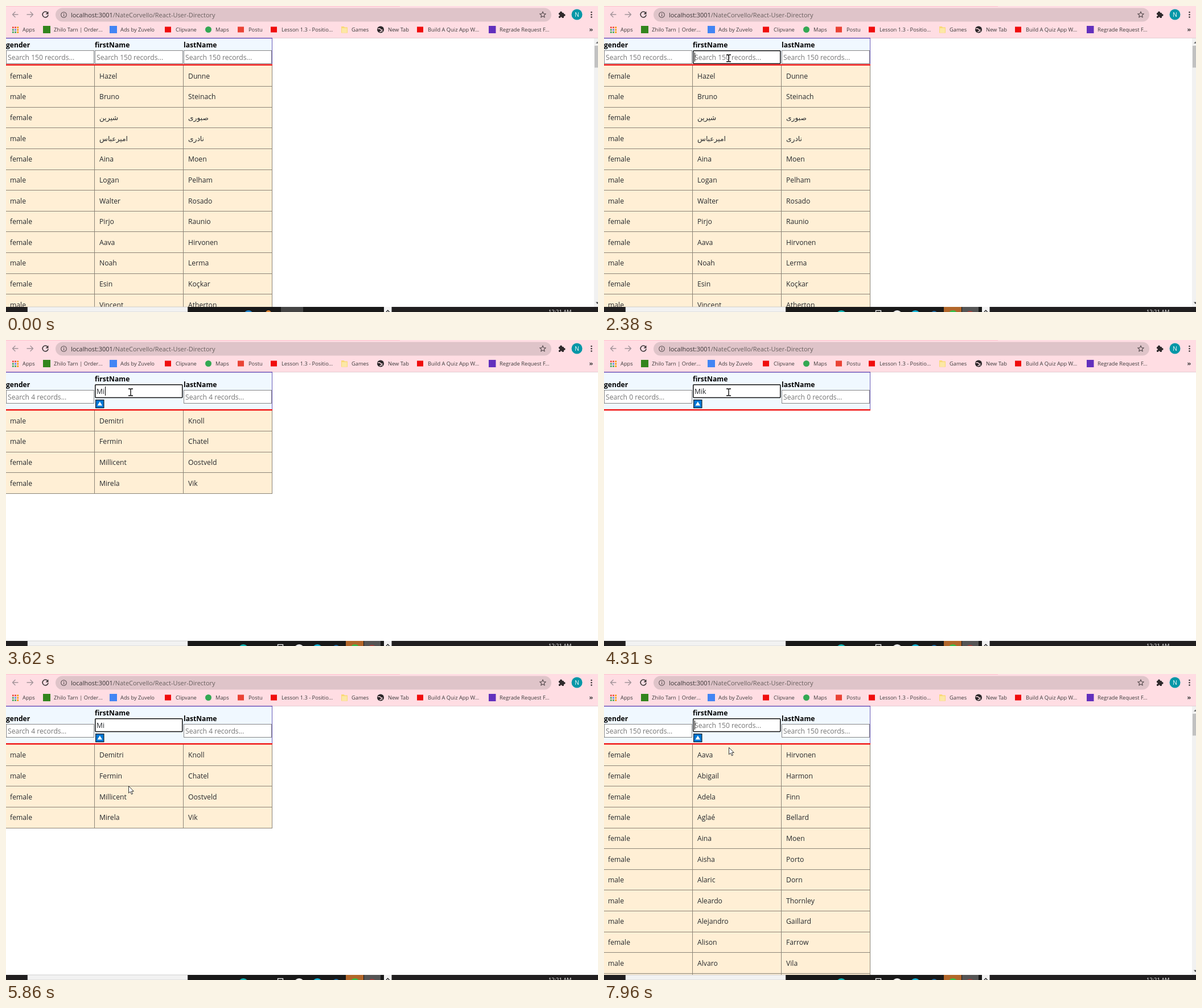
Recreate the animation shown at these times as an HTML page. Size 1040x539 px, loop 8000 ms.

```html
<!DOCTYPE html>
<html lang="en">
<head>
<meta charset="utf-8">
<title>User directory</title>
<style>
  html, body { margin: 0; width: 100%; height: 100%; overflow: hidden; background: #fff; }
  svg { display: block; position: absolute; left: 0; top: 0; }
  text { font: 12.2px "Open Sans", "Noto Sans", "DejaVu Sans", sans-serif; fill: #25282c; white-space: pre; }
  .label { font-weight: 700; font-size: 12.1px; fill: #000; }
  .hint { font-size: 12.1px; fill: #757575; }
  .mark { font-size: 9.3px; fill: #3c3a3b; }
  .url { font-size: 10.95px; fill: #69605f; }
  .line { fill: none; stroke-linecap: round; stroke-linejoin: round; }
</style>
</head>
<body>
<svg width="1040" height="539" viewBox="0 0 1040 539">
  <g id="page"></g>
  <g id="chrome"></g>
  <g id="taskbar"></g>
  <g id="pointer"></g>
</svg>
<script>
const LOOP = 8000, PITCH = 36.62, COLS = [0, 156, 312];
const $ = id => document.getElementById(id);

const rect = (x, y, w, h, fill, extra = '') =>
  `<rect x="${x}" y="${y}" width="${w}" height="${h}" fill="${fill}" ${extra}/>`;
const circle = (x, y, r, fill, extra = '') =>
  `<circle cx="${x}" cy="${y}" r="${r}" fill="${fill}" ${extra}/>`;
const text = (x, y, s, cls = '', extra = '') => `<text x="${x}" y="${y}" class="${cls}" ${extra}>${s}</text>`;
const line = (d, stroke, width = 1.4) =>
  `<path class="line" d="${d}" stroke="${stroke}" stroke-width="${width}"/>`;
const shape = (d, fill) => `<path d="${d}" fill="${fill}"/>`;

const people = s => s.split('|').map(p => {
  const [sex, first, last] = p.split(' ');
  return [sex === 'f' ? 'female' : 'male', first, last];
});

const unsorted = people('f Hazel Dunne|m Bruno Steinach|f شیرین صبوری|m امیرعباس نادری|f Aina Moen|' +
  'm Logan Pelham|m Walter Rosado|f Pirjo Raunio|f Aava Hirvonen|m Noah Lerma|f Esin Koçkar|m Vincent Atherton');
const sorted = people('f Aava Hirvonen|f Abigail Harmon|f Adela Finn|f Aglaé Bellard|f Aina Moen|f Aisha Porto|' +
  'm Alaric Dorn|m Aleardo Thornley|m Alejandro Gaillard|f Alison Farrow|m Alvaro Vila');
const withM = people('f Amrei Holten|f Carmen Kallio|f Carmen Nurmi|m Demitri Knoll|m Fermin Chatel|f Gamze Başol|' +
  'm Graham Roux|f Mabelle Holt|m Mai Reis|f Mara Sterling|m Mateo Dawkins');
const withMi = people('m Demitri Knoll|m Fermin Chatel|f Millicent Oostveld|f Mirela Vik');

// start time, visible rows, record count, typed query, first row's bottom edge
const states = [
  [0, unsorted, 150, '', 141.1],
  [2450, sorted, 150, '', 160.1],
  [3450, withM, 20, 'M', 160.1],
  [3620, withMi, 4, 'Mi', 160.1],
  [3770, [], 0, 'Mik', 160.1],
  [4540, withMi, 4, 'Mi', 160.7],
  [7400, withM, 20, 'M', 160.7],
  [7640, sorted, 150, '', 160.7]
];
const HOVER = 1840, FOCUS = 2290;
const caretX = [159, 171, 174, 180];
const blinks = [FOCUS, 2840, 3390, 4310, 4860, 5390, 5920, 6450, 6940, 7490, 7960];

// pointer runs: first step, last step, number of steps, end point
const runs = [
  [460, 600, 3, 700, 463],
  [670, 740, 2, 628, 479],
  [990, 1130, 3, 389, 398],
  [1300, 1430, 3, 229, 161],
  [1680, 1990, 5, 219, 92],
  [5320, 6100, 11, 213, 240],
  [6180, 6560, 6, 283, 196],
  [6800, 6940, 3, 219, 129]
];

function pointerAt(t) {
  if (t < runs[0][0]) return null;
  let x = 1060, y = 545;
  for (const [from, to, steps, endX, endY] of runs) {
    if (t < from) break;
    const step = Math.min(steps, 1 + Math.floor((t - from) / (to - from) * (steps - 1) + 1e-6));
    const k = (1 - Math.cos(Math.PI * step / steps)) / 2;
    x += (endX - x) * k;
    y += (endY - y) * k;
  }
  return [Math.round(x), Math.round(y)];
}

function drawPointer(t) {
  const p = pointerAt(t);
  if (!p) return '';
  const [x, y] = p;
  const art = y < 104
    ? line('M-3.5-6h2.3q1.2 0 1.2 1v10q0 1-1.2 1h-2.3M3.5-6h-2.3q-1.2 0-1.2 1M0 5q0 1 1.2 1h2.3', '#000', 1.3)
    : '<path d="M.5.5v12.3l2.9-2.6 2.1 4.7 2-.9-2.1-4.5h3.9z" fill="#fff" stroke="#222" stroke-width=".9"/>';
  return `<g transform="translate(${x} ${y})">${art}</g>`;
}

function drawRows(rows, edge, scrolls) {
  if (!rows.length) return '';
  const top = edge - PITCH;
  const end = scrolls ? 539 : Math.round(edge + (rows.length - 1) * PITCH) + 1;
  let out = rect(0, top, 468, end - top, '#ffefd5');
  for (const x of COLS) out += rect(x + 155, top, 1, end - top, '#8b8477');
  rows.forEach((cells, i) => {
    out += rect(0, Math.round(edge + i * PITCH), 468, 1, '#8b8477');
    const base = Math.round(edge - 17.3 + i * PITCH) + 4;
    cells.forEach((s, c) => out += text([7, 164, 320][c], base, s));
  });
  return out + (scrolls ? rect(0, Math.round(edge + rows.length * PITCH), 468, 1, '#8b8477') : '');
}

function drawHeader(t, count, query, sortedBy, caretOn) {
  const bottom = sortedBy ? 122 : 102.5;
  let out = rect(0, 57, 468, bottom - 57, '#f0f8ff') + rect(467, 57, 1, bottom - 57, '#6a5bb8');
  ['gender', 'firstName', 'lastName'].forEach((name, c) => {
    const x = COLS[c], active = c === 1, dy = sortedBy && !active ? 10 : 0;
    const border = active && t >= HOVER ? '#4f4f4f' : '#858585';
    out += text(x, 73 + dy, name, 'label');
    out += active && t >= FOCUS
      ? rect(156.8, 78.8, 153, 22.6, '#fff', 'stroke="#101010" stroke-width="1.5" rx="1"')
      : rect(x + .5, 78.5 + dy, 154, 23, '#fff', `stroke="${border}"`);
    out += active && query
      ? text(159, 95, query)
      : text(x + 3, 95 + dy, `Search ${count} records...`, 'hint');
  });
  if (caretOn) out += rect(caretX[query.length], 82, 1, 16, '#000');
  if (sortedBy) {
    out += rect(157.6, 105.6, 14.3, 14, '#0078d7', 'stroke="#10202c" stroke-width="1.2"') +
      shape('M164.8 108.6l4.3 7h-8.6z', '#fff');
  }
  return out + rect(0, bottom, 468, 2.3, '#f00a0a');
}

function drawScrollbar(count) {
  return rect(1033, 57, 7, 473, '#f1f1f1') +
    rect(1034, 70, 6, count > 100 ? 38.5 : 264.5, '#c1c1c1') +
    shape('M1036 66l3-3.5 3 3.5z', '#777') + shape('M1036 521.5l3 3.5 3-3.5z', '#444');
}

function drawPage(t) {
  const [start, rows, count, query, edge] = states.filter(s => s[0] <= t).pop();
  const scrolls = count > 11;
  const caretOn = blinks.filter(b => b <= t).length % 2 === 1;
  return drawRows(rows, edge, scrolls) + drawHeader(t, count, query, start > 0, caretOn) +
    (scrolls ? drawScrollbar(count) : '');
}

function drawChrome() {
  const dark = '#3b3638', faint = '#a3949a';
  let out = rect(0, 0, 1040, 56.5, '#ffdde3') + rect(0, 0, 692, 1, '#ffc1ce') +
    rect(468, 56, 572, 1, '#e3cfd3') + rect(0, 56, 468, 1.3, '#5b3fae');
  out += line('M21 15H11.5M16 10.5L11.5 15l4.5 4.5', faint) + line('M37 15h10M43 10.5l4.5 4.5-4.5 4.5', faint);
  out += line('M73.3 12.2A5 5 0 1 0 74 16.3', dark, 1.6) + shape('M74.5 9.5v5h-5z', dark);
  out += rect(87, 3.5, 871, 24, '#dfc4c9', 'rx="12"');
  out += circle(101.5, 15.5, 4.8, 'none', 'stroke="#5c5153" stroke-width="1.1"') +
    rect(101, 14.7, 1.2, 3.5, '#5c5153') + rect(101, 12.5, 1.2, 1.3, '#5c5153');
  out += text(114, 19.5, '<tspan fill="#3a3536">localhost:3001</tspan>/NateCorvello/React-User-Directory', 'url');
  const star = [...Array(10)].map((_, i) => {
    const r = i % 2 ? 2.5 : 5.6, a = Math.PI * (i / 5 - .5);
    return `${943 + r * Math.cos(a)} ${15.5 + r * Math.sin(a)}`;
  });
  out += line(`M${star.join('L')}Z`, '#574c4f', 1.1);
  out += rect(971, 12, 9, 9, '#2f2a2c', 'rx="1"') + circle(975, 11.5, 2.1, '#2f2a2c') +
    circle(980.5, 16, 2.1, '#2f2a2c') + circle(971.3, 16.5, 1.5, '#ffdde3') + circle(975.3, 20.7, 1.5, '#ffdde3');
  out += circle(1003, 15, 9.5, '#0597a7') +
    text(1003, 18.6, 'N', 'mark', 'text-anchor="middle" style="fill:#fff;font-size:10px"');
  for (const y of [11, 15.3, 19.6]) out += circle(1028.5, y, 1.3, dark);

  const tones = ['#ea4335', '#ea4335', '#f29900', '#34a853', '#4285f4', '#f29900', '#34a853', '#34a853', '#f29900'];
  tones.forEach((c, i) => out += rect(11 + i % 3 * 4.2, 36.5 + Math.floor(i / 3) * 4.2, 2.7, 2.7, c));
  out += rect(65, 35, 13, 13, '#32851d') + rect(182, 35, 13, 13, '#4285f4');
  out += circle(355.5, 41.5, 5.5, '#34a853') + rect(407, 36.5, 11, 10, '#ea4335');
  for (const x of [279, 465, 722]) out += rect(x, 36.5, 11, 10, '#f00d0d');
  out += shape('M589 36h4.5l1.5 1.5h5v10h-11z', '#f9d978') + rect(590, 39, 9, 8, '#fce7a5');
  out += circle(658, 41.5, 6, '#2b2729') + line('M654 40q3-1 4 1t3 1M657 45.5q2-2 4-1', '#ffdde3', 1.5);
  out += rect(848, 35, 12.5, 13, '#6230bd');
  const marks = [[29, 'Apps'], [84, 'Zhilo Tarn | Order...'], [201, 'Ads by Zuvelo'], [298, 'Clipvane'],
    [368, 'Maps'], [426, 'Postu'], [484, 'Lesson 1.3 - Positio...'], [607, 'Games'], [671, 'New Tab'],
    [741, 'Build A Quiz App W...'], [867, 'Regrade Request F...']];
  for (const [x, s] of marks) out += text(x, 45, s, 'mark');
  return out + text(1024.5, 45, '»', 'mark', 'style="font-weight:700;font-size:11px"');
}

function drawTaskbar(t) {
  let out = rect(0, 530, 1040, 9, '#211f20') + rect(320, 530, 343, 9, '#191919') +
    rect(38, 530, 281, 9, '#f2f2f2', 'stroke="#b5b5b5" stroke-width=".6"');
  if (t < FOCUS) {
    out += rect(483, 530, 39, 9, '#454545') + circle(426, 544, 8, '#2587cf') + circle(461, 541, 5, '#e08a3c');
  } else {
    out += rect(597, 530, 31, 9, '#b2672b') + rect(629, 530, 29, 9, '#555') +
      circle(417, 545, 9, '#12b5b5') + rect(477.5, 536.5, 9, 8, 'none', 'stroke="#eee" stroke-width="1.4"') +
      circle(515, 545, 9, '#eee') + circle(547, 545, 9, '#16b4d8') + circle(580, 543, 6, '#1f6ea8') +
      circle(613, 545, 9, '#35c04a') + circle(643, 545, 8, '#a5403c');
  }
  out += rect(664, 530, 13.5, 9, '#f2f2f2') + line('M668 539l2.7-3 2.7 3', '#222', 1.2);
  return out + text(953, 542.3, '12:21 AM', 'mark', 'style="fill:#fff"');
}

const shown = {};
function show(id, art) {
  if (shown[id] !== art) $(id).innerHTML = shown[id] = art;
}

function frame() {
  const t = performance.now() % LOOP;
  show('page', drawPage(t));
  show('taskbar', drawTaskbar(t));
  show('pointer', drawPointer(t));
  requestAnimationFrame(frame);
}

show('chrome', drawChrome());
frame();
</script>
</body>
</html>
```
